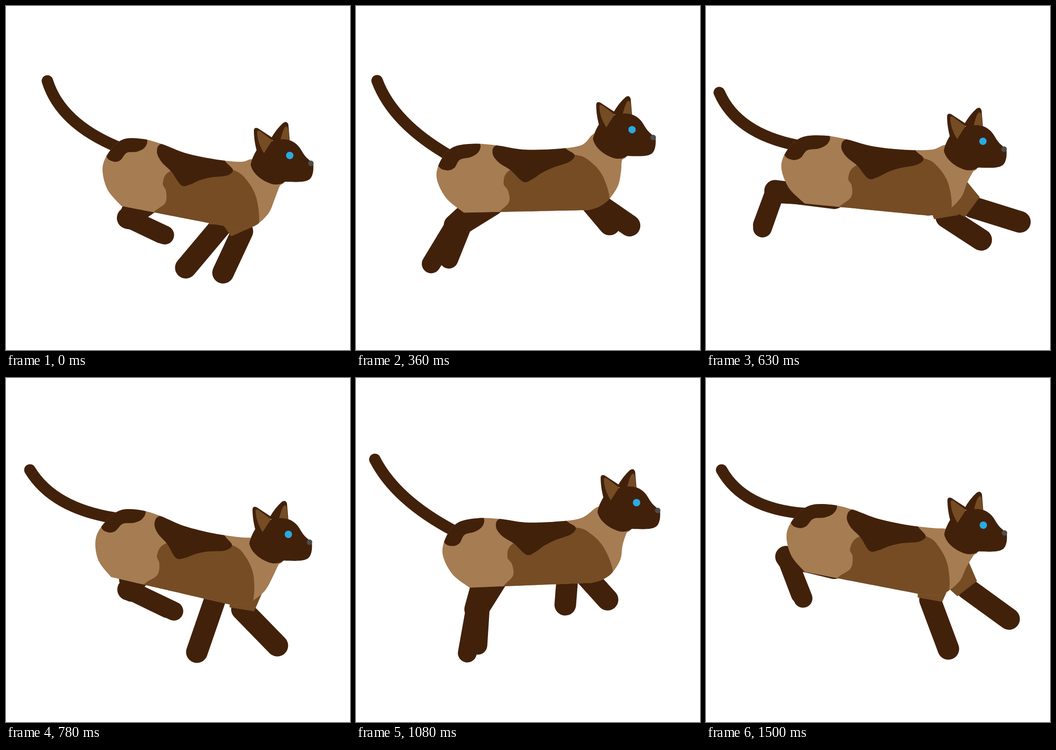
An HTML page with a canvas for the animation above (1530 ms loop, 748x748 px).

```html
<!DOCTYPE html>
<html lang="en">
<head>
<meta charset="utf-8">
<title>Running cat</title>
<style>
  html, body { margin: 0; width: 100%; height: 100%; overflow: hidden; background: #fff; }
  canvas { display: block; width: 748px; height: 748px; }
</style>
</head>
<body>
<canvas id="stage" width="748" height="748"></canvas>
<script>
const ctx = document.getElementById('stage').getContext('2d');
const DARK = '#42210b', MID = '#754c24', TAN = '#a67c52';
const LOOP = 1530, STEP = 30;

// Torso at rest; a repeated point makes a corner. The neck is placed around the eye.
const trunk = [[510,453], [510,453], [248,452], [248,452], [212,420], [194,375], [206,335], [232,309],
  [275,302], [321,306], [375,316], [440,317], [495,311]];
const neck = [[-80,8], [-40,20], [-14,56], [-22,67]];
const chest = [[579,375], [573,405], [554,433], [533,447]];
const rump = [[197,349], [215,360], [231,355], [243,337], [266,331], [282,320], [286,303], [270,285], [180,300]];
const saddle = [[321,305], [311,323], [323,343], [348,361], [373,386], [392,381], [412,368], [436,357],
  [470,346], [481,332], [465,319], [440,300], [375,300]];
const flank = [[346,360], [332,388], [341,405], [342,430], [320,453], [310,480], [545,470], [556,432],
  [540,380], [513,347], [484,332], [420,330]];

// back, belly: sideways shift of the torso edges at rump, middle and chest; lift: vertical shift
// front: elbow x, y, upper arm angle, paw x, y; rear: knee, paw, offset of the far paw
const plant = {
  eye: [599,280], tail: [65,155], back: [0,0,0], belly: [0,0,0], lift: [0,0,0],
  front: [[479,440,90,457,539], [480,440,90,513,539]], rear: [272,500, 268,596, 57,-14]
};
const gather = {
  eye: [617,325], tail: [90,163], back: [27,16,18], belly: [3,1,-10], lift: [-24,5,42],
  front: [[470,475,90,391,569], [514,490,66,472,580]], rear: [268,462, 345,498, -7,-2]
};
const push = {
  eye: [610,271], tail: [41,177], back: [-9,-6,-3], belly: [-2,1,4], lift: [6,-2,-10],
  front: [[460,430,90,455,493], [500,430,70,547,482]], rear: [259,503, 242,598, 23,-17]
};
const leap = {
  eye: [604,262], tail: [27,172], back: [-42,-21,-2], belly: [-34,-17,-12], lift: [-10,-8,-21],
  front: [[556,426,55,655,404], [575,418,28,686,411]], rear: [145,444, 50,505, 8,-4]
};
const land = {
  eye: [603,320], tail: [34,200], back: [-6,0,3], belly: [-33,-32,-32], lift: [-36,-9,32],
  front: [[487,482,100,527,589], [568,458,52,659,524]], rear: [177,393, 211,479, -6,-9]
};
const fold = {
  eye: [614,340], tail: [52,200], back: [21,14,21], belly: [-21,-18,-25], lift: [-27,7,54],
  front: [[455,480,95,415,596], [513,503,99,590,582]], rear: [273,463, 365,507, -15,-6]
};
const stretch = blend((a, b) => a + (b - a) * 1.1, push, leap);

const run = [
  [0, gather], [240, plant], [480, leap], [550, stretch], [690, land], [780, fold],
  [850, gather], [1020, plant], [1080, push], [1290, leap], [1360, stretch], [1500, land]
];

// Applies f to matching numbers of several poses
function blend(f, ...p) {
  if (typeof p[0] === 'number') return f(...p);
  const part = k => blend(f, ...p.map(v => v[k]));
  return Array.isArray(p[0])
    ? p[0].map((_, i) => part(i))
    : Object.fromEntries(Object.keys(p[0]).map(k => [k, part(k)]));
}

// Cubic Hermite through unevenly spaced keys
function poseAt(t) {
  const last = run.length - 1;
  let i = 0;
  while (i < last - 1 && run[i + 1][0] <= t) i++;
  const [[tp, p], [t0, a], [t1, b], [tn, n]] = [i - 1, i, i + 1, i + 2].map(k => run[Math.min(Math.max(k, 0), last)]);
  const h = t1 - t0, u = Math.min((t - t0) / h, 1), w = 1 - u;
  return blend((p, a, b, n) => {
    const m0 = (b - p) / (t1 - tp) * h, m1 = (n - a) / (tn - t0) * h;
    return a * w * w * (1 + 2 * u) + b * u * u * (3 - 2 * u) + m0 * u * w * w - m1 * u * u * w;
  }, p, a, b, n);
}

// Bends a resting torso point: parabola along the spine, linear from back to belly
function warp(pose, [x, y]) {
  const s = (x - 380) / 180, v = (y - 310) / 140;
  const along = ([a, b, c]) => a * s * (s - 1) / 2 + b * (1 - s * s) + c * s * (s + 1) / 2;
  return [x + along(pose.back) * (1 - v) + along(pose.belly) * v, y + along(pose.lift)];
}

// Smooth closed curve through all points
function blob(pts) {
  const n = pts.length, path = new Path2D();
  path.moveTo(...pts[0]);
  for (let i = 0; i < n; i++) {
    const [[px, py], [ax, ay], [bx, by], [nx, ny]] = [i - 1, i, i + 1, i + 2].map(k => pts[(k + n) % n]);
    if (ax === bx && ay === by) continue;
    path.bezierCurveTo(ax + (bx - px) / 6, ay + (by - py) / 6, bx - (nx - ax) / 6, by - (ny - ay) / 6, bx, by);
  }
  path.closePath();
  return path;
}

function fill(path, color) {
  ctx.fillStyle = color;
  ctx.fill(path);
}

function dot(x, y, r, color) {
  ctx.fillStyle = color;
  ctx.beginPath();
  ctx.arc(x, y, r, 0, 2 * Math.PI);
  ctx.fill();
}

// Round-ended dark stroke, curved when a control point is given
function limb(width, [x0, y0], [x1, y1], [cx, cy] = [x0, y0]) {
  ctx.strokeStyle = DARK;
  ctx.lineWidth = width;
  ctx.lineCap = 'round';
  ctx.beginPath();
  ctx.moveTo(x0, y0);
  ctx.quadraticCurveTo(cx, cy, x1, y1);
  ctx.stroke();
}

// The tail sags more when its ends come closer
function drawTail(pose) {
  const [x0, y0] = pose.tail, [x1, y1] = warp(pose, [222, 328]);
  const dx = x1 - x0, dy = y1 - y0, len = Math.hypot(dx, dy);
  const sag = 2 * (83 - .28 * len) / len;
  limb(25, [x0, y0], [x1, y1], [x0 + dx * .4 - dy * sag, y0 + dy * .4 + dx * sag]);
}

function drawRear(pose, hip, far) {
  const [kx, ky, px, py, ox, oy] = pose.rear;
  const knee = [kx + ox * far / 2, ky + oy * far / 2];
  limb(47, warp(pose, hip), knee);
  limb(41, knee, [px + ox * far, py + oy * far]);
}

function drawFront([x, y, deg, px, py]) {
  limb(47, [x, y], [px, py]);
  ctx.save();
  ctx.translate(x, y);
  ctx.rotate(deg * Math.PI / 180);
  fill(upperArm, MID);
  ctx.restore();
}

function drawTorso(pose) {
  const bend = pts => pts.map(p => warp(pose, p));
  const [ex, ey] = pose.eye;
  const body = blob([...bend(trunk), ...neck.map(([x, y]) => [ex + x, ey + y]), ...bend(chest)]);
  fill(body, TAN);
  ctx.save();
  ctx.clip(body);
  fill(blob(bend(flank)), MID);
  fill(blob(bend(rump)), DARK);
  fill(blob(bend(saddle)), DARK);
  ctx.restore();
}

// Head parts are placed around the eye
const upperArm = new Path2D('M0-27V27L-50 36V-40Z');
const skull = new Path2D('M-20-35C3-37 18-25 26-10C33 3 41 9 51 17C52 27 52 43 44 51C35 59 15 58-10 57C-17 62-27 65-39 62C-59 56-81 40-85 20C-82 5-76-5-70-15C-57-25-37-35-20-35Z');
const nearEar = new Path2D('M-71-7C-76-25-78-40-78-55Q-77-62-69-59L-37-38L-55-4Z');
const nearInner = new Path2D('M-71-50Q-71-56-65-53L-38-33L-56-5C-64-17-71-35-71-50Z');
const farEar = new Path2D('M-42-35Q-29-58-14-71Q-6-76-3-67L0-31L-20-25Z');
const farInner = new Path2D('M-20-35C-16-50-13-61-8-63Q-4-63-3-55L-1-33Q-10-36-20-35Z');

function drawHead([x, y]) {
  ctx.save();
  ctx.translate(x, y);
  fill(farEar, DARK);
  fill(skull, DARK);
  fill(farInner, MID);
  fill(nearEar, DARK);
  fill(nearInner, MID);
  dot(0, 0, 8, '#29abe2');
  dot(46, 17, 6, '#4d4d4d');
  ctx.restore();
}

function draw(now) {
  const pose = poseAt(Math.floor(now % LOOP / STEP) * STEP);
  ctx.fillStyle = '#fff';
  ctx.fillRect(0, 0, 748, 748);
  drawTail(pose);
  drawRear(pose, [308, 435], 1);
  drawRear(pose, [280, 430], 0);
  pose.front.forEach(drawFront);
  drawTorso(pose);
  drawHead(pose.eye);
}

let start;
function tick(now) {
  start ??= now;
  draw(now - start);
  requestAnimationFrame(tick);
}
draw(0);
requestAnimationFrame(tick);
</script>
</body>
</html>
```
